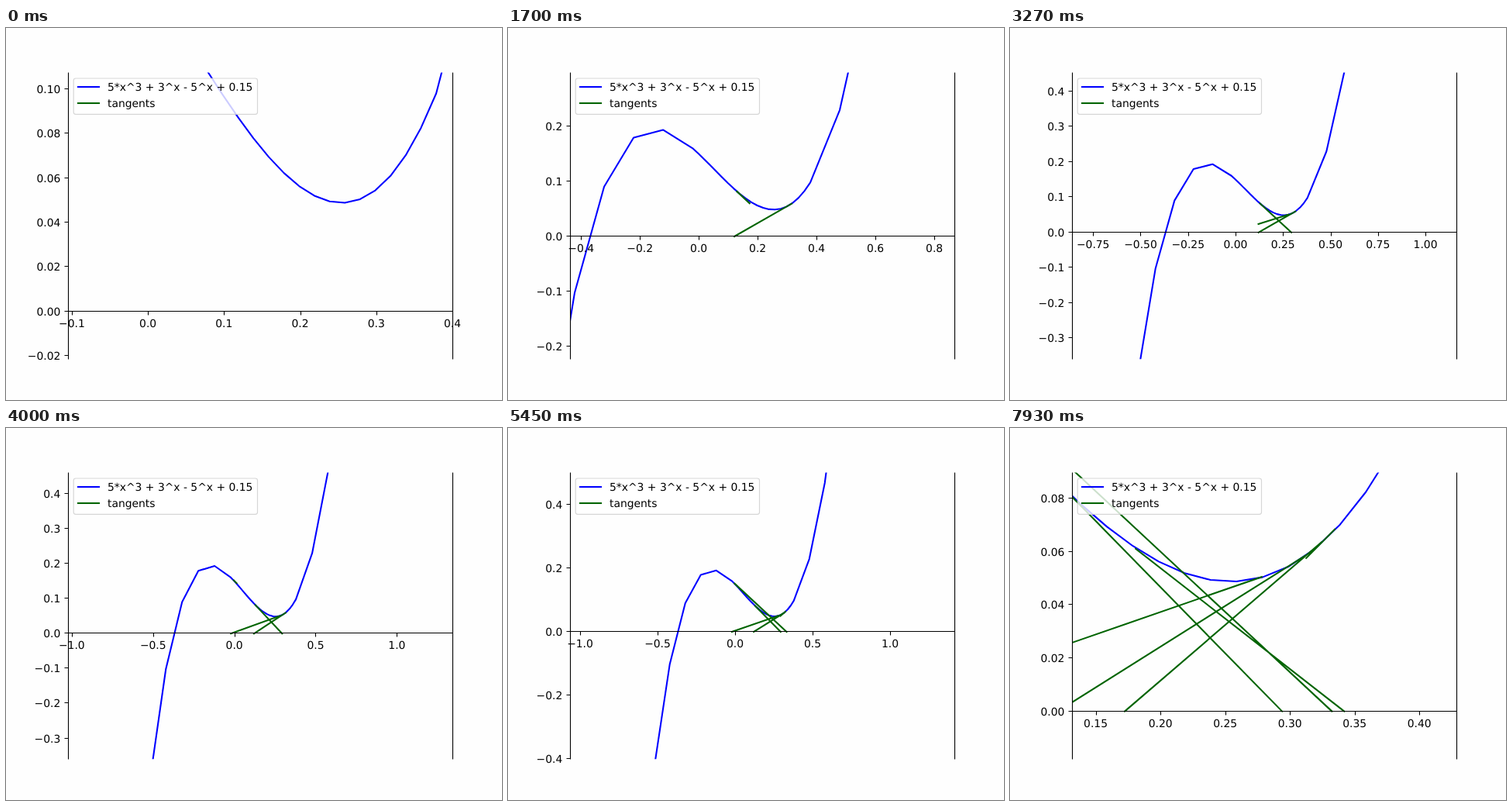
Animation of 640x480 px, one loop 7990 ms. Source, as an HTML page:

```html
<!DOCTYPE html>
<html lang="en">
<head>
<meta charset="utf-8">
<title>Newton iteration</title>
<style>
  html, body { margin: 0; width: 100%; height: 100%; overflow: hidden; background: #fefefe; }
  svg { display: block; width: 640px; height: 480px; }
  text { font: 13.89px "DejaVu Sans", sans-serif; fill: #000; text-rendering: geometricPrecision; }
  path { fill: none; }
  .line { stroke-width: 2.08; stroke-linejoin: round; stroke-linecap: square; }
  .blue { stroke: #00f; }
  .green { stroke: #006400; }
  .axis { stroke: #000; stroke-width: 1.1; }
  .mid { text-anchor: middle; }
  .end { text-anchor: end; }
</style>
</head>
<body>
<svg viewBox="0 0 640 480">
  <clipPath id="plot"><rect x="80" y="57.6" width="496" height="369.6"/></clipPath>
  <g clip-path="url(#plot)">
    <path id="curve" class="line blue"/>
    <path id="tangents" class="line green"/>
  </g>
  <path id="axes" class="axis"/>
  <g id="labels"></g>
  <rect x="87.2" y="65" width="237.3" height="46.4" rx="2.8" fill="#fff" fill-opacity=".8" stroke="#ccc" stroke-opacity=".8" stroke-width="1.2"/>
  <path class="line blue" d="M93 76H120"/>
  <path class="line green" d="M93 97H120"/>
  <text x="131" y="81">5*x^3 + 3^x - 5^x + 0.15</text>
  <text x="131" y="102">tangents</text>
</svg>
<script>
const LOOP = 7990, SEGMENT = 1270, HOLD = 130, STEP = 60, STEPS = 20;
const BOX = { left: 80, top: 57.6, width: 496, height: 369.6 };
const BOTTOM = BOX.top + BOX.height;

const f = x => 5 * x ** 3 + 3 ** x - 5 ** x + 0.15;
const iterates = [0.3157, 0.1207, 0.294, -0.0213, 0.3325, 0.1724, 0.342, 0.195];

// step, left, right, bottom, top
const camera = [
  [0, -0.105, 0.4, -0.0215, 0.1074],
  [26, -0.4372, 0.868, -0.2228, 0.2977],
  [51, -0.861, 1.163, -0.3592, 0.4532],
  [75, -1.1316, 1.479, -0.3592, 0.4685],
  [85, -1.065, 1.415, -0.4015, 0.5022],
  [104, 0.0702, 0.4313, -0.0398, 0.1099],
  [110, 0.12, 0.43, 0.001, 0.095],
  [117, 0.1317, 0.4286, -0.01795, 0.0898]
];

// The curve is sampled finely only where the iteration takes place.
const range = (from, to, step) =>
  Array.from({ length: to - from + 1 }, (_, i) => iterates[3] + (from + i) * step);
const samples = [...range(-12, -1, 0.1), ...range(0, 20, 0.02), ...range(5, 15, 0.1)];

const byId = id => document.getElementById(id);
const lerp = (a, b, s) => a + (b - a) * s;

// Thin lines sit on whole pixels; y is rounded upwards from the stage bottom.
const snapX = x => Math.floor(x + 0.5) + 0.5;
const snapY = y => Math.ceil(y - 0.5) - 0.5;

function secant(i, col) {
  const a = camera[i], b = camera[i + 1];
  return (b[col] - a[col]) / (b[0] - a[0]);
}

function slope(i, col) {
  if (i === 0) return secant(0, col);
  if (i === camera.length - 1) return 0;
  const p = secant(i - 1, col), q = secant(i, col);
  return p * q > 0 ? 2 * p * q / (p + q) : 0;
}

// Monotone cubic interpolation of one view limit.
function limit(step, col) {
  const last = camera.length - 1;
  if (step >= camera[last][0]) return camera[last][col];
  const i = camera.findIndex(row => row[0] > step) - 1;
  const a = camera[i], b = camera[i + 1];
  const h = b[0] - a[0], s = (step - a[0]) / h;
  const ease = s * s * (3 - 2 * s);
  return lerp(a[col], b[col], ease)
    + h * s * (1 - s) * ((1 - s) * slope(i, col) - s * slope(i + 1, col));
}

function tickValues(lo, hi) {
  const raw = (hi - lo) / 9;
  const power = 10 ** Math.floor(Math.log10(raw));
  const factor = [1, 2, 2.5, 5, 10].find(m => m * power >= raw * 0.999999);
  const size = factor * power;
  const digits = Math.max(1, -Math.floor(Math.log10(size) + 1e-9) + (factor === 2.5 ? 1 : 0));
  const ticks = [];
  for (let n = Math.ceil(lo / size); n * size <= hi; n++) {
    const label = Math.abs(n * size).toFixed(digits);
    ticks.push({ value: n * size, label: n < 0 ? "\u2212" + label : label });
  }
  return ticks;
}

function draw(step) {
  const [left, right, bottom, top] = [1, 2, 3, 4].map(col => limit(step, col));
  const px = x => BOX.left + (x - left) / (right - left) * BOX.width;
  const py = y => BOTTOM - (y - bottom) / (top - bottom) * BOX.height;
  const point = (x, y) => px(x).toFixed(2) + " " + py(y).toFixed(2);

  byId("curve").setAttribute("d", "M" + samples.map(x => point(x, f(x))).join("L"));

  let lines = "";
  for (let k = 0; k < iterates.length - 1; k++) {
    const from = k ? 1 / STEPS : 0;
    const to = Math.min(1, step / STEPS - k);
    if (to <= from + 1e-9) break;
    const at = s => point(lerp(iterates[k], iterates[k + 1], s), f(iterates[k]) * (1 - s));
    lines += `M${at(from)}L${at(to)}`;
  }
  byId("tangents").setAttribute("d", lines);

  const zero = snapY(py(0));
  let axes = `M80.5 57.6V427.5M576.5 57.6V427.5M80 ${zero}H577`;
  let labels = "";
  for (const { value, label } of tickValues(left, right)) {
    const x = px(value);
    axes += `M${snapX(x)} ${zero}v5`;
    labels += `<text class="mid" x="${x.toFixed(2)}" y="${zero + 20.5}">${label}</text>`;
  }
  for (const { value, label } of tickValues(bottom, top)) {
    const y = snapY(py(value));
    axes += `M80.5 ${y}h-5`;
    labels += `<text class="end" x="70.3" y="${y + 5.5}">${label}</text>`;
  }
  byId("axes").setAttribute("d", axes);
  byId("labels").innerHTML = labels;
}

function stepAt(time) {
  const segment = Math.floor(time / SEGMENT), rest = time % SEGMENT;
  return segment * STEPS + (rest < HOLD ? 0 : 1 + Math.floor((rest - HOLD) / STEP));
}

const start = performance.now();
let shown = -1;
function tick() {
  const step = stepAt((performance.now() - start) % LOOP);
  if (step !== shown) draw(shown = step);
  requestAnimationFrame(tick);
}
tick();
</script>
</body>
</html>
```
